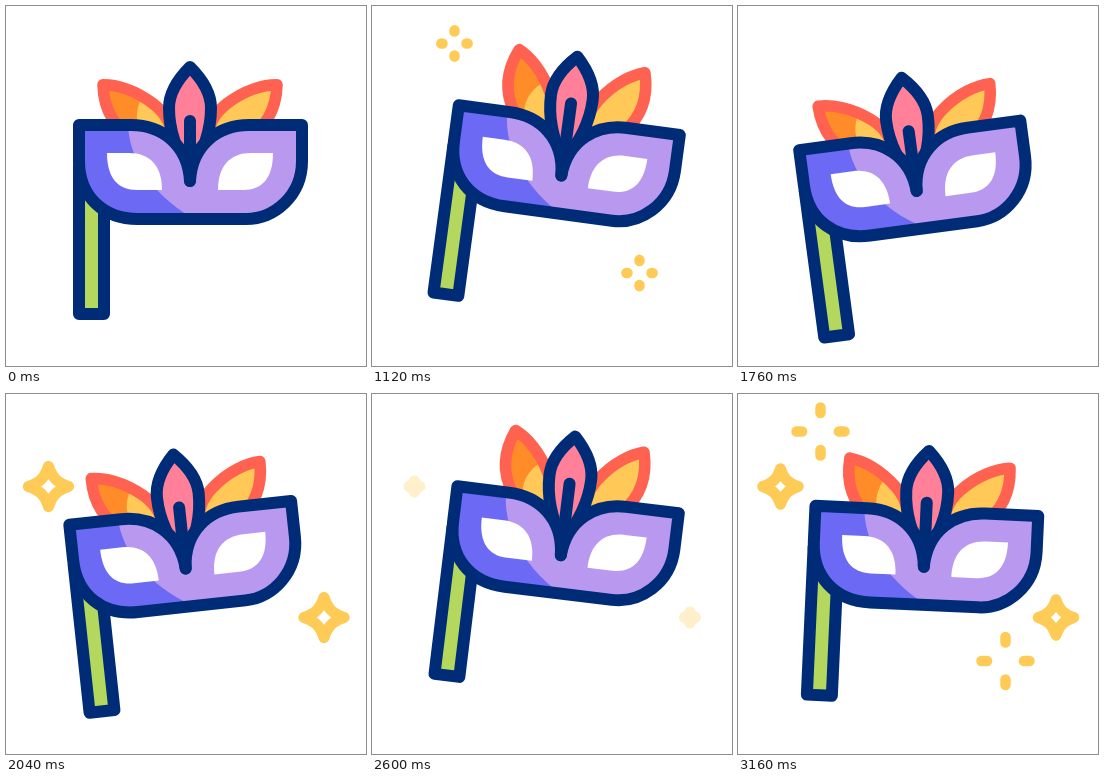
Animation of 360 by 360 pixels, one loop 3180 ms. Source, as an HTML page:

```html
<!DOCTYPE html>
<html lang="en">
<head>
<meta charset="utf-8">
<title>Carnival mask</title>
<style>
html, body { margin: 0; width: 100%; height: 100%; overflow: hidden; background: #fff; }
svg { display: block; width: 100vw; height: 100vh; }
.line { stroke: #002c77; stroke-width: 12; stroke-linecap: round; stroke-linejoin: round; }
.plume { stroke: #ff6250; stroke-width: 11.5; stroke-linejoin: round; }
.spark { fill: none; stroke: #ffcb57; stroke-width: 11; stroke-linecap: round; stroke-linejoin: round; }
</style>
</head>
<body>
<svg viewBox="0 0 360 360">
  <defs>
    <path id="leaf" d="M0-80C8-70 16-52 16-28C16-10 8 2 0 6C-10 2-22-8-24-22C-27-45-18-65 0-80Z"/>
    <path id="eye" d="M101 147H123C144 147 156 160 156 184H131C112 184 101 172 101 147Z"/>
    <path id="face" d="M73 119H125C155 119 182 138 184 175C186 138 213 119 243 119H296V155C296 190 268 213 240 213H132C97 213 73 190 73 155Z"/>
  </defs>
  <g id="mask">
    <g id="left">
      <use href="#leaf" fill="#ff8c28"/>
      <path fill="#ffc857" d="M15-42C-4-38-14-28-18-8L0 4L16-10Z"/>
      <use href="#leaf" class="plume" fill="none"/>
    </g>
    <g id="right"><use href="#leaf" class="plume" fill="#ffc857"/></g>
    <path id="center" class="line" fill="#ff8098" d="M184 61C171 74 163 88 163 102C163 128 172 148 184 166C196 148 205 128 205 102C205 88 197 74 184 61Z"/>
    <path class="line" fill="#b4d85e" d="M73 160V308H98V180Z"/>
    <use href="#face" fill="#b999f0"/>
    <path fill="#6c69f5" d="M73 119H122C123 150 143 187 188 213H132C97 213 73 190 73 155Z"/>
    <use href="#eye" fill="#fff"/>
    <use href="#eye" fill="#fff" transform="translate(368 0) scale(-1 1)"/>
    <use href="#face" class="line" fill="none"/>
    <path id="stem" class="line" fill="none"/>
  </g>
  <g id="sparks">
    <path class="spark star" transform="translate(42.5 92.5)"/>
    <path class="spark star" transform="translate(318 223.5)"/>
    <path class="spark burst" transform="translate(82.5 37.5)"/>
    <path class="spark burst" transform="translate(267.5 267)"/>
  </g>
</svg>
<script>
const LOOP = 3180, START = 220, CYCLE = 1700;
const SWAY = [START, 1050, 1840, 2750, 3420];
const BOB = [START, 771, 1665, 2490, 3400];

const $ = id => document.getElementById(id);
const move = (id, transform) => $(id).setAttribute('transform', transform);
const setAll = (cls, attrs) => {
  for (const el of document.querySelectorAll(cls))
    for (const name in attrs) el.setAttribute(name, attrs[name]);
};

// cosine ease from 0 to 1 between times a and b
const ramp = (t, a, b) =>
  (1 - Math.cos(Math.PI * Math.max(0, Math.min(1, (t - a) / (b - a))))) / 2;
const pop = (t, a, top, b) => ramp(t, a, top) - ramp(t, top, b);

// rest, peak, low, peak, rest at the five turning times
function swing(t, [a, b, c, d, e], peak, low) {
  const base = t > b && t < d ? low : 0;
  const up = t < c ? pop(t, a, b, c) : pop(t, c, d, e);
  return base + (peak - base) * up;
}

function starPath(r) {
  const a = r * .2, b = r * .42;
  return `M0 ${-r}C${a} ${-b} ${b} ${-a} ${r} 0C${b} ${a} ${a} ${b} 0 ${r}` +
    `C${-a} ${b} ${-b} ${a} ${-r} 0C${-b} ${-a} ${-a} ${-b} 0 ${-r}Z`;
}

const burstPath = (tail, head) => [[0, -1], [1, 0], [0, 1], [-1, 0]].map(([x, y]) =>
  `M${x * tail} ${y * tail}L${x * head} ${y * head}`).join('');

function draw(t) {
  const open = swing(t, SWAY, 1, 0);
  move('mask', `translate(0 ${swing(t, BOB, -15, 11)}) rotate(${swing(t, SWAY, 8, -8)} 180 215)`);
  move('left', `translate(160 128) rotate(${27 * open - 52})`);
  move('right', `translate(208 128) rotate(${52 - 18 * open}) scale(-1 1)`);
  move('center', `translate(0 ${-6 * open})`);
  $('stem').setAttribute('d', `M184 ${115 - 13 * open}V175`);

  $('sparks').setAttribute('visibility', t < START ? 'hidden' : 'visible');
  const s = 1000 + (t - 1000 + CYCLE) % CYCLE;
  const shine = pop(s, 1200, 1560, 1740) + pop(s, 1860, 2060, 2670);
  setAll('.star', { d: starPath(5 + 15.5 * shine), opacity: Math.min(1, 10 * shine) });

  const head = 11 + 13 * ramp(s, 1020, 1400);
  const tail = Math.min(12 + 12 * ramp(s, 1200, 1700), head - .01);
  const width = 10.5 * (ramp(s, 1010, 1080) - ramp(s, 1610, 1720));
  setAll('.burst', { d: burstPath(tail, head), style: `stroke-width:${width}` });
}

const begin = performance.now();
function tick() {
  draw((performance.now() - begin) % LOOP);
  requestAnimationFrame(tick);
}
tick();
</script>
</body>
</html>
```
